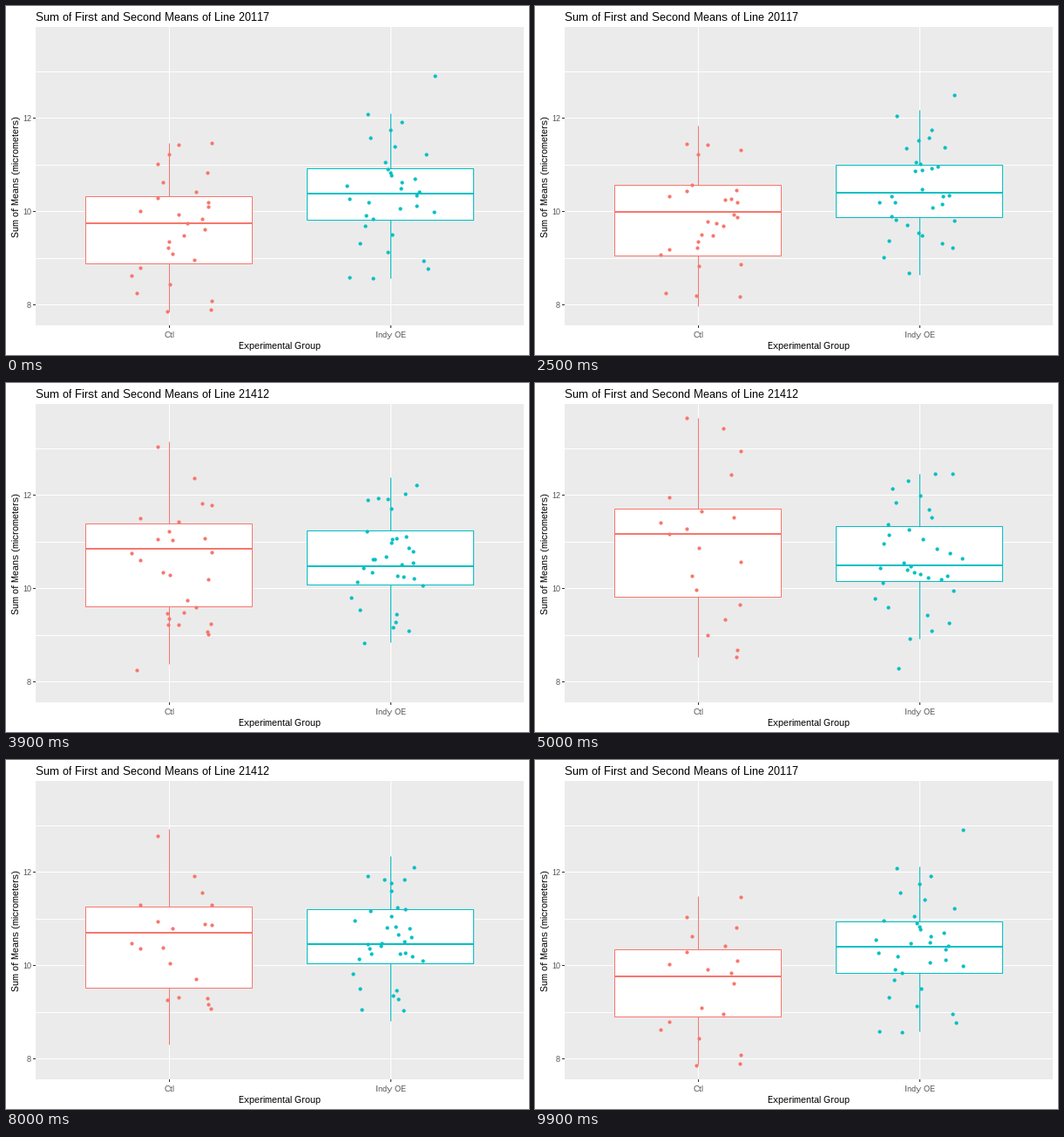
A matplotlib script for the animation above (10000 ms loop, 600 by 400 pixels).

```python
import numpy as np
import matplotlib.pyplot as plt
from matplotlib.animation import FuncAnimation
from matplotlib.patches import Rectangle

W, H, DPI = 600, 400, 100
PX = 72 / DPI
FRAMES, INTERVAL = 100, 100
RED, TEAL = "#F8766D", "#00BFC4"
LINES = ("20117", "21412")
JITTER = 51

# Share of points above each level:
# top point, whisker, upper quartile, median, lower quartile, whisker, bottom point
SHARES = (0, 0.03, 0.25, 0.5, 0.75, 0.97, 1)

plt.rcParams.update({
    "font.family": "Liberation Sans",
    "text.hinting": "native",
    "text.hinting_factor": 1,
})

fig = plt.figure(figsize=(W / DPI, H / DPI), dpi=DPI, facecolor="white")
ax = fig.add_axes([0, 0, 1, 1])
ax.set_xlim(0, W)
ax.set_ylim(H, 0)
ax.axis("off")


def line(xs, ys, color, z, width=1):
    return ax.plot(xs, ys, color=color, lw=width * PX, zorder=z, snap=False,
                   solid_capstyle="butt")[0]


def label(x, y, text, size, color="black", **kw):
    return ax.text(x, y, text, fontsize=size * PX, color=color, zorder=6, **kw)


def spread(n, levels, rng):
    """n heights that follow the box levels, in random order."""
    return rng.permutation(np.interp(np.linspace(0, 1, n), SHARES, levels))


class Group:
    """One box plot with its jittered points, moving between two states."""

    def __init__(self, mid, color, first, second, counts, drift, seed):
        self.mid = mid + 0.5
        self.levels = np.array([first, second], float)
        left, right = mid - 95.5, mid + 95.5
        self.upper = line([], [], color, 3)
        self.lower = line([], [], color, 3)
        self.rect = Rectangle((left, 0), right - left, 1, fc="white",
                              ec=color, lw=PX, zorder=4, snap=False)
        ax.add_patch(self.rect)
        self.median = line([left - 0.5, right + 0.5], [0, 0], color, 5, 2)
        self.dots = ax.scatter([], [], s=(4.2 * PX) ** 2, c=color,
                               linewidths=0, zorder=7)

        rng = np.random.default_rng(seed)
        xs = mid + rng.uniform(-JITTER, JITTER, max(counts))
        new_xs = mid + rng.uniform(-JITTER, JITTER, max(counts)) if drift else xs
        self.ends = [np.column_stack([x[:n], spread(n, lv, rng)])
                     for x, n, lv in zip((xs, new_xs), counts, self.levels)]
        self.shared = min(counts)

    def place(self, s, start):
        """Blend by s; points without a partner wait in the state left behind."""
        a, b = self.levels
        high, q3, med, q1, low = np.floor(a + s * (b - a))[1:-1] + 0.5
        self.upper.set_data([self.mid] * 2, [high, q3])
        self.lower.set_data([self.mid] * 2, [q1, low])
        self.rect.set_y(q3)
        self.rect.set_height(q1 - q3)
        self.median.set_ydata([med - 0.5] * 2)
        n = self.shared
        p, q = (end[:n] for end in self.ends)
        self.dots.set_offsets(np.vstack([p + s * (q - p), self.ends[start][n:]]))


# Panel, grid, axes
ax.add_patch(Rectangle((34, 24), 560, 342, fc="#EBEBEB", lw=0, zorder=0))
for value in range(8, 14):
    y = np.floor(342.5 - 53.5 * (value - 8)) + 0.5
    line([34, 594], [y, y], "white", 1)
    if value in (8, 10, 12):
        line([31, 34], [y, y], "#333333", 2)
        label(29, y + 3.5, str(value), 9, "#4D4D4D", ha="right")
for name, x in (("Ctl", 187.5), ("Indy OE", 441.5)):
    line([x, x], [24, 366], "white", 1)
    line([x, x], [366, 369], "#333333", 2)
    label(x - 0.5, 380.5, name, 9, "#4D4D4D", ha="center")
label(314, 393, "Experimental Group", 11, ha="center")
label(15.5, 195.5, "Sum of Means (micrometers)", 11, rotation=90,
      ha="center", va="baseline", rotation_mode="anchor")
title = label(34, 17, "", 13)

groups = (
    Group(187, RED, (157, 157, 218, 249, 295, 350, 350),
          (40, 40, 144, 173, 245, 314, 314), (27, 19), False, 4),
    Group(441, TEAL, (80, 123, 186, 215, 245, 312, 312),
          (104, 104, 164, 209, 227, 293, 327), (32, 34), True, 7),
)


def ease(t):
    return (1 - np.cos(np.pi * np.clip(t, 0, 1))) / 2


def draw(i):
    start = int(i >= 50)
    s = 1 - ease((i - 67) / 33) if start else ease((i - 16) / 34)
    for group in groups:
        group.place(s, start)
    title.set_text("Sum of First and Second Means of Line "
                   + LINES[int(s > 0.499)])
    return []


anim = FuncAnimation(fig, draw, frames=FRAMES, interval=INTERVAL,
                     init_func=lambda: draw(0), repeat=True, repeat_delay=0)
plt.show()
```
